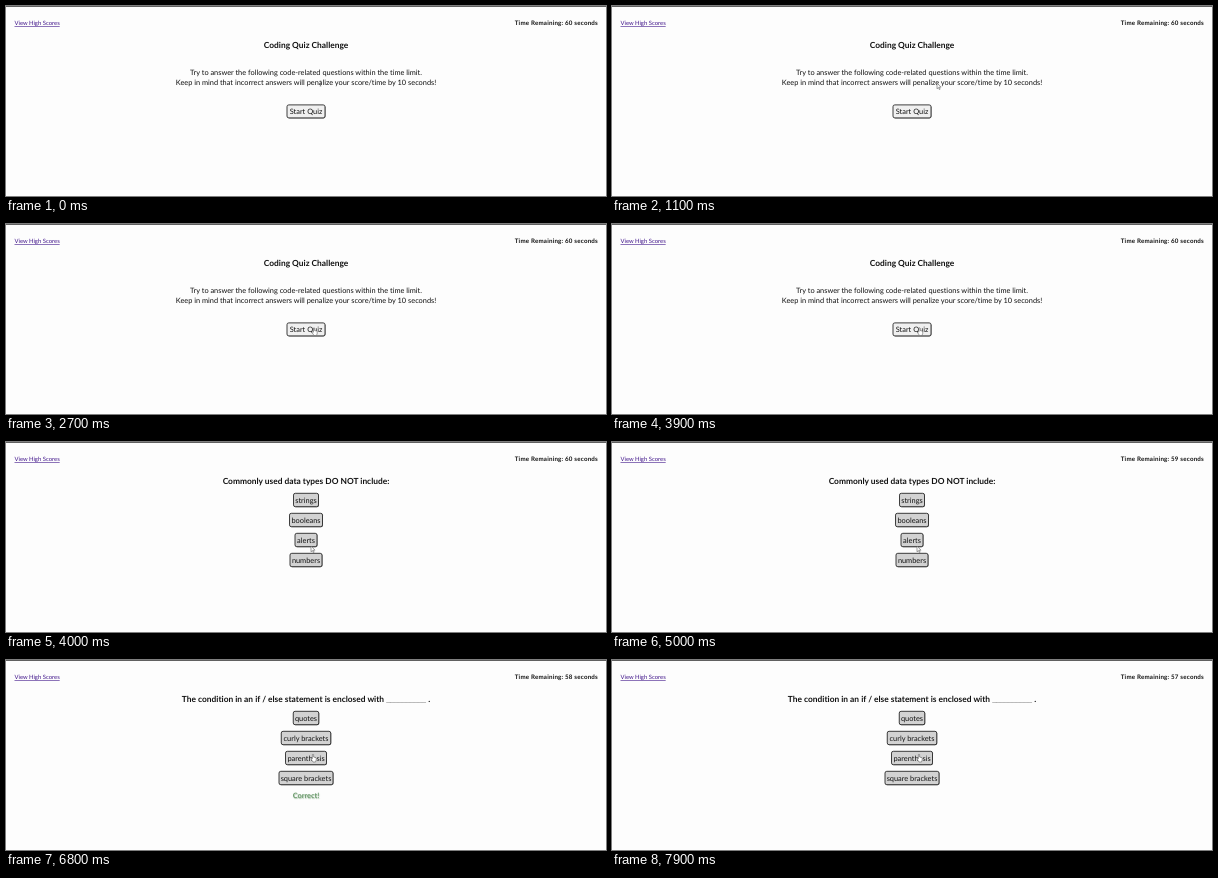
Recreate the animation shown at these times as an HTML page. Size 600 by 190 pixels, loop 8 s.

```html
<!DOCTYPE html>
<html lang="en">
<head>
<meta charset="utf-8">
<title>Coding Quiz</title>
<style>
  html, body { margin: 0; width: 100%; height: 100%; overflow: hidden; background: #fdfdfd; }
  svg {
    display: block; font: 7.38px Lato, sans-serif; fill: #111; text-anchor: middle;
    text-rendering: geometricPrecision; font-variant-ligatures: none;
  }
  .title { font-size: 8.4px; font-weight: 700; }
  .label { font-size: 7.4px; }
  .link { font-size: 5.9px; fill: #40158a; text-anchor: start; text-decoration: underline; }
  .timer { font-size: 6.2px; font-weight: 700; letter-spacing: .2px; text-anchor: end; }
  .blank { font: 700 7.2px "Liberation Sans", Arial, sans-serif; }
  .correct { font-weight: 700; fill: #6b9a6c; text-shadow: .5px .5px 1px #a9c4aa; }
  .cursor { fill: #fff; stroke: #555; stroke-width: .55; stroke-linejoin: round; }
</style>
</head>
<body>
<svg width="600" height="190" viewBox="0 0 600 190">
  <rect width="600" height="1" fill="#606060"/>
  <text class="link" x="8.5" y="19.2">View High Scores</text>
  <text class="timer" x="592" y="19.2">Time Remaining: <tspan id="seconds">60</tspan> seconds</text>
  <g id="screen"></g>
  <path id="cursor" class="cursor"/>
</svg>
<script>
const LOOP = 8000, STEP = 100;
const $ = id => document.getElementById(id);

const text = (cls, y, content) => `<text class="${cls}" x="300" y="${y}">${content}</text>`;

function button(label, y, width, height = 13.4, fill = '#d2d2d2') {
  const x = 300 - width / 2, top = y - height / 2;
  const box = (d, style) =>
    `<rect x="${x + d}" y="${top + d}" width="${width}" height="${height}" rx="1.8" ${style}/>`;
  return box(.5, 'fill="#777"') + box(0, `fill="${fill}" stroke="#2a2a2a" stroke-width=".9"`) +
    text('label', y + 2.6, label);
}

const question = (title, answers) => text('title', 41.8, title) +
  answers.map(([label, width], i) => button(label, 58 + 20 * i, width)).join('');

const intro = text('title', 41.8, 'Coding Quiz Challenge') +
  text('', 68.6, 'Try to answer the following code-related questions within the time limit.') +
  text('', 79, 'Keep in mind that incorrect answers will penalize your score/time by 10 seconds!') +
  button('Start Quiz', 105.4, 38, 13, '#f0f0f0');
const first = question('Commonly used data types DO NOT include:',
  [['strings', 25], ['booleans', 33], ['alerts', 22], ['numbers', 32]]);
const second = question(
  'The condition in an if / else statement is enclosed with <tspan class="blank">__________</tspan> .',
  [['quotes', 25.5], ['curly brackets', 49.5], ['parenthesis', 41], ['square brackets', 54]]);

// Each list holds [start time, value] pairs.
const screens = [[0, intro], [4000, first], [6600, second + text('correct', 138.4, 'Correct!')], [7800, second]];
const seconds = [[0, 60], [4800, 59], [5900, 58], [6900, 57]];
const shapes = {
  beam: 'M-.8 -2.5H.8M0 -2.5V2.5M-.8 2.5H.8',
  arrow: 'M0 0V5.8L1.4 4.5L2.3 6.5L3.1 6.2L2.3 4.2H4Z',
  hand: 'M-.6 .5Q0 -.1 .6 .5V3L2.6 3.5Q3.2 3.7 3.2 4.3V6L2.5 8H0L-2 5Q-2 4.1 -1.1 4.3L-.6 4.7Z'
};
const pointers = [[0, 'beam'], [500, 'arrow'], [2500, 'hand'], [4000, 'arrow'], [5400, 'hand']];

// Cursor path as [time, x, y].
const path = [
  [0, 314.5, 77.5], [500, 325, 77], [1300, 325, 77], [1500, 325, 79], [1600, 325, 79],
  [2000, 315.5, 84.5], [2100, 315.5, 84.5], [2500, 309, 103.5], [2800, 307.5, 103.5],
  [3900, 307.5, 103.5], [4000, 305, 104], [5100, 305, 104], [5400, 308, 113],
  [5700, 307, 94], [LOOP, 307, 94]
];

const current = (list, t) => list.filter(([start]) => start <= t).pop()[1];

function cursorAt(t) {
  const i = path.findIndex(([time]) => time > t);
  const [t0, x0, y0] = path[i - 1], [t1, x1, y1] = path[i];
  const k = (t - t0) / (t1 - t0);
  return [x0 + (x1 - x0) * k, y0 + (y1 - y0) * k];
}

let shown;
function draw(now) {
  const t = Math.floor(now % LOOP / STEP) * STEP;
  const screen = current(screens, t);
  if (screen !== shown) $('screen').innerHTML = shown = screen;
  $('seconds').textContent = current(seconds, t);
  $('cursor').setAttribute('d', shapes[current(pointers, t)]);
  $('cursor').setAttribute('transform', `translate(${cursorAt(t)})`);
}

const begin = performance.now();
function tick() {
  draw(performance.now() - begin);
  requestAnimationFrame(tick);
}
tick();
</script>
</body>
</html>
```
